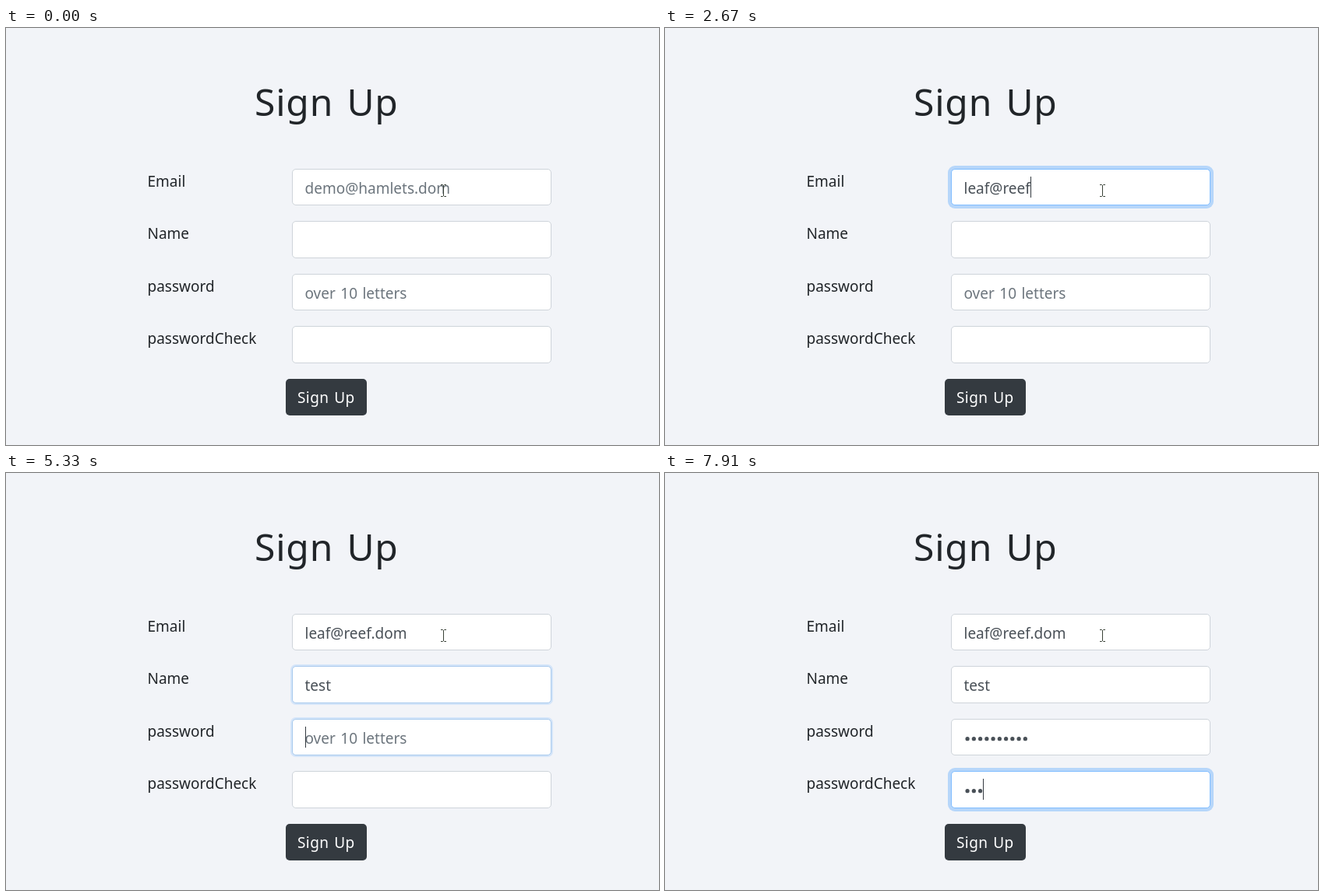
Write an HTML page that moves like this. It is 838 px wide and 536 px high and loops after 8 s.

```html
<!DOCTYPE html>
<html lang="en">
<head>
<meta charset="utf-8">
<title>Sign Up</title>
<style>
  html, body { margin: 0; width: 100%; height: 100%; overflow: hidden; background: #f2f4f8; }
  svg { display: block; width: 100%; height: 100%; }
  text { font: 19px "Noto Sans", "Open Sans", sans-serif; fill: #212529; word-spacing: 1.5px; white-space: pre; }
  .title { font-size: 48px; letter-spacing: .8px; word-spacing: 4px; }
  .button { fill: #fff; letter-spacing: .4px; }
  .value { fill: #495057; }
  .hint { fill: #6c757d; }
</style>
</head>
<body>
<svg id="stage" viewBox="0 0 838 536">
  <rect width="838" height="536" fill="#f2f4f8"/>
  <text class="title" x="319" y="112.5">Sign Up</text>
  <g id="form"></g>
  <rect x="359" y="451" width="104" height="47" rx="5" fill="#343a40"/>
  <text class="button" x="374" y="482">Sign Up</text>
  <rect id="caret" width="1" height="27" fill="#343a40"/>
  <path d="M558 201.5h2.5l1 1 1-1h2.5M558 216.5h2.5l1-1 1 1h2.5M561.5 202v14" fill="none" stroke="#3a4238"/>
</svg>
<script>
const LOOP = 8000;
const TEXT_X = 383.5, DOT_STEP = 8.25;
const form = document.getElementById('form');
const caret = document.getElementById('caret');

// keys: the time at which each character appears
const fields = [
  { label: 'Email', top: 181, height: 47, hint: 'demo@hamlets.dom', value: 'leaf@reef.dom', focus: 350,
    keys: [1120, 1200, 1320, 1440, 2150, 2280, 2410, 2540, 2670, 3380, 3540, 3700, 3860] },
  { label: 'Name', top: 248, height: 48, hint: '', value: 'test', focus: 4020,
    keys: [4480, 4610, 4740, 4860] },
  { label: 'password', top: 316, height: 47, hint: 'over 10 letters', focus: 5270,
    keys: [5540, 5670, 5800, 5930, 6060, 6190, 6500, 6710, 6910, 7120] },
  { label: 'passwordCheck', top: 383, height: 48, hint: '', focus: 7450,
    keys: [7690, 7800, 7910] }
];
const caretOff = [[890, 1120], [2010, 2150], [3220, 3380]];

function add(tag, attrs, parent = form) {
  const el = document.createElementNS('http://www.w3.org/2000/svg', tag);
  for (const k in attrs) el.setAttribute(k, attrs[k]);
  parent.appendChild(el);
  return el;
}

fields.forEach((f, i) => {
  f.blur = i + 1 < fields.length ? fields[i + 1].focus : Infinity;
  f.ring = add('rect', { fill: '#007bff' });
  f.box = add('rect', { x: 367.5, y: f.top + .5, width: 332, height: f.height - 1, rx: 4.5, fill: '#fff' });
  add('text', { x: 181.5, y: f.top + 23 }).textContent = f.label;
  f.text = add('text', { x: TEXT_X, y: f.top + 32 });
  if (!f.value) {
    f.dots = f.keys.map((_, n) =>
      add('circle', { cx: 388.1 + n * DOT_STEP, cy: f.top + 25.7, r: 2.6, fill: '#495057' }));
  }
});

// Three held poses of the focus transition
function fade(dt) {
  return dt < 0 ? 0 : dt < 60 ? .08 : dt < 140 ? .5 : 1;
}

function mix(a, b, p) {
  return 'rgb(' + a.map((v, i) => Math.round(v + (b[i] - v) * p)) + ')';
}

function drawField(f, t) {
  const glow = fade(t - f.focus) - fade(t - f.blur);
  const spread = 4 * glow;
  const ring = {
    x: 367 - spread, y: f.top - spread, width: 333 + 2 * spread,
    height: f.height + 2 * spread, rx: 5 + spread, opacity: .25 * glow
  };
  for (const k in ring) f.ring.setAttribute(k, ring[k]);
  f.box.setAttribute('stroke', mix([206, 212, 218], [128, 189, 255], glow));

  const typed = f.keys.filter(k => k <= t).length;
  const shown = typed ? (f.value || '').slice(0, typed) : f.hint;
  if (f.text.textContent !== shown) f.text.textContent = shown;
  f.text.setAttribute('class', typed ? 'value' : 'hint');
  if (f.dots) f.dots.forEach((d, n) => d.setAttribute('visibility', n < typed ? 'visible' : 'hidden'));

  if (t >= f.focus && t < f.blur) {
    const width = !typed ? 0 : f.dots ? typed * DOT_STEP : f.text.getComputedTextLength();
    caret.setAttribute('x', Math.round(TEXT_X + width));
    caret.setAttribute('y', f.top + 10);
  }
}

function draw(t) {
  fields.forEach(f => drawField(f, t));
  const hidden = t < fields[0].focus || caretOff.some(([a, b]) => t >= a && t < b);
  caret.setAttribute('visibility', hidden ? 'hidden' : 'visible');
}

const start = performance.now();
function tick() {
  draw((performance.now() - start) % LOOP);
  requestAnimationFrame(tick);
}
tick();
</script>
</body>
</html>
```
